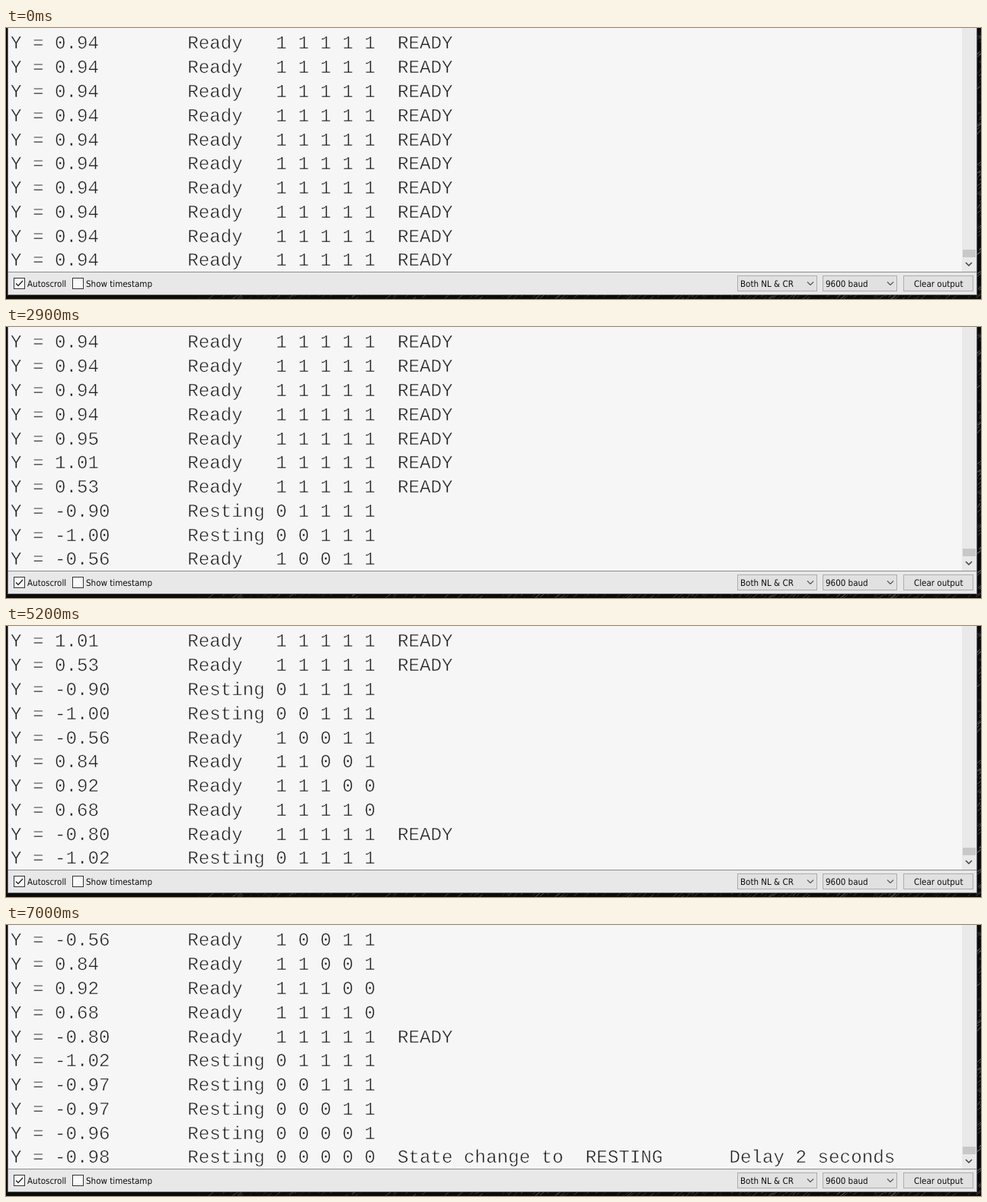
Write an HTML page with a canvas that moves like this. It is 1280 px wide and 357 px high and loops after 8 s.

```html
<!DOCTYPE html>
<html lang="en">
<head>
<meta charset="utf-8">
<title>Serial monitor</title>
<style>
  html, body { margin: 0; width: 1280px; height: 357px; overflow: hidden; background: #0b0b0b; }
  canvas { display: block; }
</style>
</head>
<body>
<canvas id="stage" width="1280" height="357"></canvas>
<script>
const ctx = document.getElementById('stage').getContext('2d');
const LOOP = 8000;
const ROWS = 10;
const PAPER = '#f6f6f6';
const MONO = '24.19px "Liberation Mono", "Courier New", monospace';
const UI = 'condensed 11.5px "DejaVu Sans Condensed", "Noto Sans", sans-serif';

// Arrival time, reading, sensor state; a partial line shows `cut` characters until `done`.
const readings = [
  { at: 100, y: '0.94', ready: 1, cut: 5, done: 200 },
  { at: 600, y: '0.95', ready: 1 },
  { at: 1100, y: '1.01', ready: 1 },
  { at: 1500, y: '0.53', ready: 1 },
  { at: 2000, y: '-0.90', ready: 0 },
  { at: 2400, y: '-1.00', ready: 0, cut: 29, done: 2500 },
  { at: 2900, y: '-0.56', ready: 1 },
  { at: 3400, y: '0.84', ready: 1 },
  { at: 3800, y: '0.92', ready: 1 },
  { at: 4300, y: '0.68', ready: 1 },
  { at: 4700, y: '-0.80', ready: 1 },
  { at: 5200, y: '-1.02', ready: 0 },
  { at: 5700, y: '-0.97', ready: 0 },
  { at: 6100, y: '-0.97', ready: 0 },
  { at: 6600, y: '-0.96', ready: 0 },
  { at: 7000, y: '-0.98', ready: 0 }
];

// Each line shows the last five states, newest first.
function buildLog() {
  const idle = Array.from({ length: ROWS }, () => ({ at: 0, y: '0.94', ready: 1 }));
  let bits = [1, 1, 1, 1, 1];
  return [...idle, ...readings].map(r => {
    bits = [r.ready, ...bits.slice(0, 4)];
    const sum = bits.reduce((a, b) => a + b);
    const note = sum === 5 ? 'READY'
      : sum === 0 ? 'State change to  RESTING      Delay 2 seconds' : '';
    const text = ('Y = ' + r.y).padEnd(16) + (r.ready ? 'Ready' : 'Resting').padEnd(8)
      + bits.join(' ') + '  ' + note;
    return { ...r, text };
  });
}
const log = buildLog();

function rect(x, y, w, h, fill) {
  ctx.fillStyle = fill;
  ctx.fillRect(x, y, w, h);
}

function box(x, y, w, h, fill, edge) {
  rect(x, y, w, h, edge);
  rect(x + 1, y + 1, w - 2, h - 2, fill);
}

function polyline(points, color, width) {
  ctx.strokeStyle = color;
  ctx.lineWidth = width;
  ctx.beginPath();
  points.forEach(([x, y]) => ctx.lineTo(x, y));
  ctx.stroke();
}

function chevron(x, y, size, color, width) {
  polyline([[x - size, y - size / 2], [x, y + size / 2], [x + size, y - size / 2]], color, width);
}

function label(text, x) {
  ctx.font = UI;
  ctx.fillStyle = '#0c0c0c';
  ctx.fillText(text, x, 341);
}

// A thin paper-coloured outline slims the strokes to a typewriter weight.
function typewrite(text, x, y) {
  ctx.fillStyle = '#1c1c1c';
  ctx.fillText(text, x, y);
  ctx.strokeStyle = PAPER;
  ctx.lineWidth = 0.6;
  ctx.strokeText(text, x, y);
}

function checkbox(x, checked, text) {
  box(x, 329, 15, 15, '#fafafa', '#333');
  if (checked) polyline([[x + 3, 336.5], [x + 6, 339.5], [x + 12, 333]], '#222', 1.3);
  label(text, x + 18);
}

function combo(x, w, text) {
  box(x, 326, w, 21, '#e1e1e1', '#adadad');
  label(text, x + 4);
  chevron(x + w - 9, 336.5, 4, '#555', 1.1);
}

function drawDesktop() {
  rect(0, 0, 1280, 357, '#0b0b0b');
  let seed = 7;
  const random = () => (seed = seed * 16807 % 2147483647) / 2147483647;
  const streak = (x, y, glow) => {
    const len = 2 + random() * 6, shade = 25 + random() * glow | 0;
    polyline([[x, y], [x + len, y - len * 0.8]], `rgb(${shade},${shade},${shade})`, 0.8);
  };
  for (let i = 0; i < 200; i++) streak(250 + random() * 1030, 353 + random() * 6, 70);
  for (let i = 0; i < 90; i++) streak(1274 + random() * 5, random() * 357, 110);
}

function drawWindow() {
  rect(2, 0, 1273, 352, '#777');
  rect(3, 0, 1271, 351, '#e8e8e8');
  rect(3, 0, 1252, 321, PAPER);
  rect(1255, 0, 18, 321, '#e9e9e9');
  rect(1256, 292, 17, 10, '#c8c8c8');
  chevron(1264, 311, 4, '#444', 1.6);
  rect(3, 321, 1271, 1, '#8c8c8c');
  checkbox(10, true, 'Autoscroll');
  checkbox(87, false, 'Show timestamp');
  combo(960, 105, 'Both NL & CR');
  combo(1072, 98, '9600 baud');
  box(1178, 326, 92, 21, '#e1e1e1', '#adadad');
  label('Clear output', 1192);
}

function drawLog(t) {
  ctx.font = MONO;
  log.filter(line => line.at <= t).slice(-ROWS).forEach((line, row) => {
    const text = t < line.done ? line.text.slice(0, line.cut) : line.text;
    typewrite(text, 6, Math.round(27.4 + row * 31.78));
  });
}

function frame() {
  ctx.textRendering = 'geometricPrecision';
  ctx.lineJoin = 'round';
  drawDesktop();
  drawWindow();
  drawLog(performance.now() % LOOP);
  requestAnimationFrame(frame);
}
frame();
</script>
</body>
</html>
```
